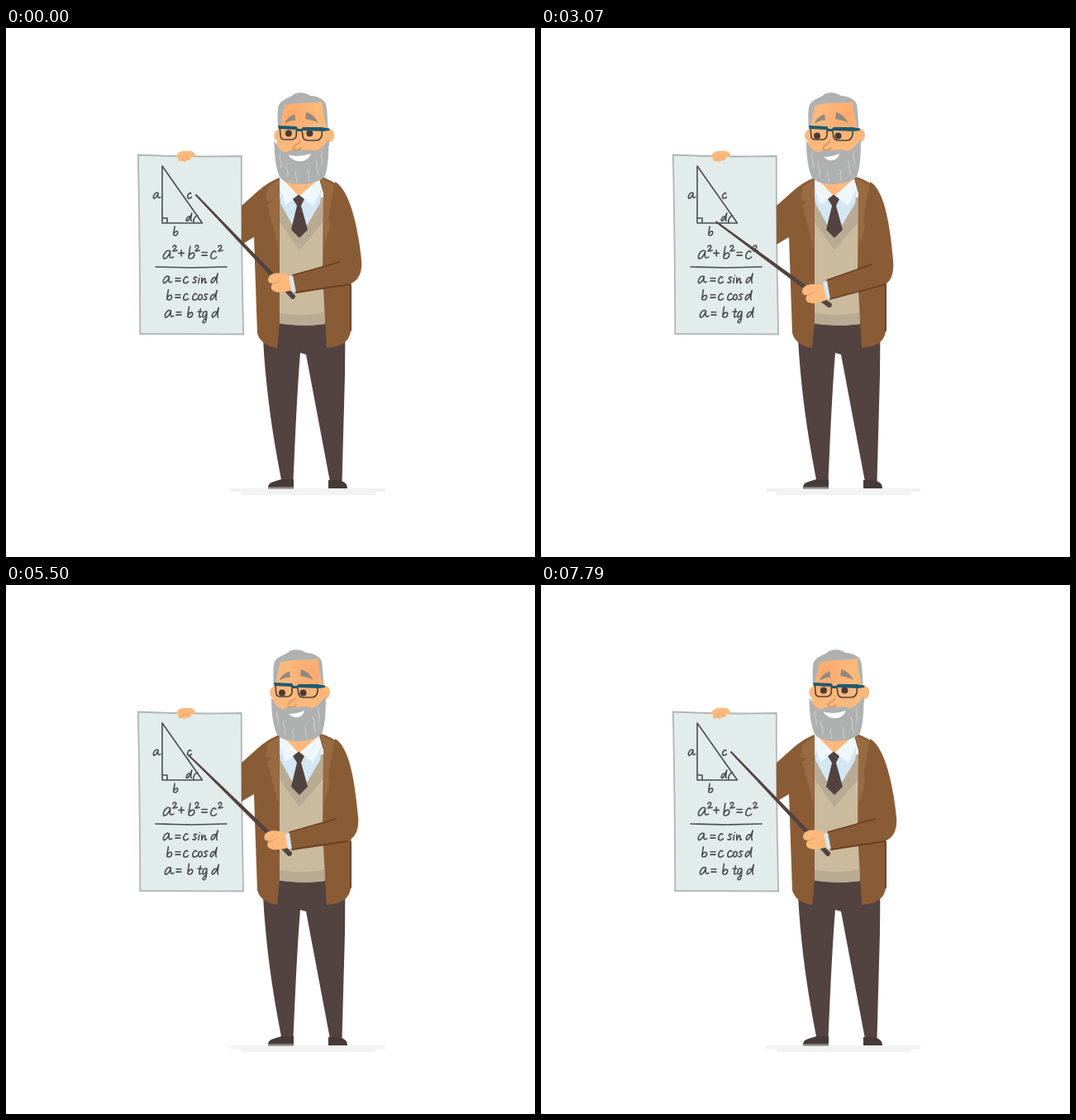
An HTML page for the animation above (7870 ms loop, 640 by 640 pixels).

```html
<!DOCTYPE html>
<html lang="en">
<head>
<meta charset="utf-8">
<title>Geometry lesson</title>
<style>
html, body { margin: 0; width: 100%; height: 100%; overflow: hidden; background: #fff; }
svg { display: block; width: 100%; height: 100%; }
.brown { fill: #8a5c36; }
.lapel { fill: #996b43; }
.dark { fill: #524340; }
.skin { fill: #fdb97c; }
.cloth { fill: #d3e7f3; }
.collar { fill: #eff7fd; }
.hair { fill: #afb1b1; }
.brow { fill: #8f8982; }
.ink, .seam, .strand, .rim, .nose, .crease { fill: none; stroke-linecap: round; stroke-linejoin: round; }
.ink { stroke: #4a4d4d; stroke-width: 1.6; }
.seam { stroke: #683f20; stroke-width: 1.8; }
.strand { stroke: #c8caca; stroke-width: 1.2; }
.rim { stroke: #514542; stroke-width: 1.7; }
.nose { stroke: #e08a55; stroke-width: 1.5; }
.crease { stroke: #ec9c63; stroke-width: 1; }
</style>
</head>
<body>
<svg viewBox="0 0 640 640" role="img" aria-label="A teacher points at a triangle and its formulas">
  <defs>
    <radialGradient id="glow" gradientUnits="userSpaceOnUse" cx="370" cy="106" r="34">
      <stop offset="0" stop-color="#fca96c"/><stop offset="1" stop-color="#fdb97c"/>
    </radialGradient>
  </defs>

  <path fill="#f2f2f2" d="M272 557H459V561.5H447V565H285V561.5H272Z"/>

  <g id="legs">
    <path class="dark" d="M311 352H410.5L410 420 406.5 549H392L363 395 356 393Q352 440 347.5 549H333.5C326 510 315 450 311 376Z"/>
    <path fill="#463a38" d="M317 556C317 549 325 549 333 546H348V557H317Z"/>
    <path fill="#7d8079" d="M317 555H348V557.5H317Z"/>
    <path fill="#463a38" d="M390 557V547H404C408 549 413 550 413 557Z"/>
  </g>

  <g id="board">
    <path fill="#e2ecea" stroke="#b0b6b6" stroke-width="1.8" d="M159.8 153.5Q220 156.5 284.8 155 284.5 260 287.2 370.5L162.3 370Q162 260 159.8 153.5Z"/>
    <path class="ink" d="M189 167V236H237.5ZM189 230H195V236M227 236C226 231 229 227 232 227M181 289 224 290 267 289"/>
    <g id="writing" class="ink"></g>
    <path class="skin" d="M206 156C207 150 213 148 219 149 225 148 229 151 229 154 229 157 225 156 224 156 224 161 220 161 219 159 218 163 214 163 213 160 210 163 207 161 208 156Z"/>
    <path class="crease" d="M213 160 215 156M219 159 220 155"/>
  </g>

  <g id="torso">
    <path fill="#cabb9e" d="M329 205H386V358C367 361 346 360 329 357Z"/>
    <path fill="#b9ab93" d="M329 344C346 348 368 348 386 344V358C367 361 346 360 329 357ZM329 205H386V232L355 269 329 232Z"/>
    <path class="cloth" d="M330 184H384L380 212 355 254 332 212Z"/>
    <path class="skin" d="M335 176H379L378 188 355 204 335 188Z"/>
    <path class="collar" d="M334 182 330 190 338 214 354 203ZM379 182 384 190 372 215 355 203Z"/>
    <path class="dark" d="M347 207 354 201.5 361 207 357 215 365 244 355 254 345 244 352 215Z"/>
    <path class="brown" d="M331 181C321 185 313 190 304 198L285 215V262L300 253 304 369C306 379 317 386 328 387L331 357Z"/>
    <path class="brown" d="M378 179C388 182 395 185 402 191L412 225 417.5 305V362C417 374 413 385 388 387L383 300 384 200Z"/>
    <path class="lapel" d="M331 183 317 192 314 208 322 210 316 214 330 266ZM380 181 399 191 402 207 393 210 399 215 385 264 384 198Z"/>
    <path class="seam" d="M417 311V366"/>
  </g>

  <g id="head">
    <path class="hair" d="M322 142C326 126 321 102 325 93 328 86 338 85 343 80 349 77 358 78 363 82 371 82 380 86 382 93 384 104 384 126 386 142Z"/>
    <ellipse class="skin" cx="325" cy="130" rx="6" ry="7"/>
    <ellipse class="skin" cx="386" cy="130" rx="6" ry="8"/>
    <path fill="url(#glow)" d="M332 94C344 89 366 92 377 89 379 102 380 114 384 122V160H323V124C329 116 328 104 332 94Z"/>
    <g id="features">
      <path class="brow" d="M331 114C334 109 338 106 343 104.5L344 112C340 111 336 113 332 115ZM356 110 357 102C363 104 368 107 371.5 115 367 112 361 111 356 110Z"/>
      <path class="nose" d="M350 137C348 141 340 142 341 146 343 149 349 148 351 145"/>
    </g>
    <g id="pupils" fill="#4b3b36"><ellipse cx="334" rx="4"/><ellipse cx="359.5" rx="4"/></g>
    <path class="rim" d="M326 121 327 132Q328 135 332 135L341 135Q346 134 346 129V124Q350 122 353 125L354 132Q355 136 360 136H371Q376 135 377 129V122"/>
    <path fill="#1e5a70" d="M324 118 346 119 348 122H352L354 120 376 120 386 121.5V124L378 125 354 124 352 125H347L345 123 325 122Z"/>
  </g>

  <g id="beard">
    <path class="hair" d="M321 136C325 143 329 151 337 150 341 146 346 149 350 148 357 148 365 146 370 149 377 148 382 141 387 134 387 154 386 170 382 180 376 186 362 189 353 189 343 189 333 187 328 181 323 171 321 154 321 136Z"/>
    <path class="strand" d="M328 153C325 159 332 162 329 169M336 164C333 170 340 173 337 180M347 174C345 179 350 181 348 186M361 171C365 176 360 180 364 185M371 160C376 166 370 169 375 178M379 149C375 155 382 159 378 166"/>
    <path id="mouth" fill="#fff"/>
  </g>

  <g id="arm">
    <path id="pole" class="dark"/>
    <g id="hand">
      <path class="skin" d="M-13-6C-11-11-4-12 2-11L17-8V9C8 12-2 13-7 10-11 8-11 4-8 1-12 1-15-2-13-6Z"/>
      <path class="crease" d="M-8 1C-5 1-2 0 0-2"/>
    </g>
    <path id="cuff" class="cloth"/>
    <path id="sleeve" class="brown"/>
    <path id="folds" class="seam"/>
  </g>
</svg>
<script>
const LOOP = 7870, STEPS = 110;
const $ = id => document.getElementById(id);
const smooth = x => (x = Math.min(1, Math.max(0, x)), x * x * (3 - 2 * x));
const mix = (a, b, k) => a + (b - a) * k;
const set = (id, name, value) => $(id).setAttribute(name, value);

// Handwritten letters, baseline at 0, x-height about 9
const letters = {
  a: 'M9-9C4-13-1-3 1 0C4 1 8-5 9-9C8-3 8 1 13-2',
  b: 'M3-15C2-9 1-4 1-1C3 1 8 0 8-5C8-8 4-8 1-3',
  c: 'M7-8C5-12 0-6 1-1C3 1 6 0 8-2',
  d: 'M7-7C3-11-1-2 1 0C4 0 8-7 10-14C9-8 7-3 9 0',
  s: 'M6-8C3-10 0-7 3-5C6-3 4 1 0-1',
  i: 'M2-7L1 0M3-11v.1',
  n: 'M1-8V0C3-6 6-9 6-5L6 0L8-1',
  o: 'M4-8C0-8 0 0 3 0C7-1 8-8 4-8Z',
  t: 'M4-12L2-2Q2 1 5-1M0-8H6',
  g: 'M7-8C2-11 0-1 2 0C5 0 7-5 7-8C7 0 6 8 3 8C0 8 1 4 6 1',
  2: 'M0-6C1-10 6-8 4-5L0 0L6-1',
  '=': 'M0-5H7M0-1H7',
  '+': 'M0-4H7M3.5-8V0'
};

// Each row: baseline, scale, then letters with their x
const rows = [
  [206, .68, 'a178 c219'], [251, .72, 'b202'], [233.5, .68, 'd218'],
  [279, .98, 'a190 b220 c247'], [276, .9, '+209 =237'],
  [270, .85, '2202 2229 2257'],
  [308.5, .82, 'a190 c214 s226 i232 n236 d248'], [307, .85, '=205'],
  [329, .82, 'b194 c214 c225 o232 s239 d247'], [327, .85, '=205'],
  [350, .84, 'a192 b219 t232 g237 d249'], [348, .85, '=206']
];
$('writing').innerHTML = rows.map(([y, size, row]) => row.split(' ').map(item =>
  `<path d="${letters[item[0]]}" stroke-width="${1.6 / size}" transform="translate(${item.slice(1)} ${y}) scale(${size})"/>`
).join('')).join('');

// Pole end x, y, angle; upper sleeve edge from/to; lower edge from/to; elbow x
const poses = {
  rest: [348, 326, 46.4, 404, 283, 347, 299, 416, 310, 351, 320, 430],
  a:    [318, 317, 42,   392, 280, 322, 292, 408, 309, 325, 313, 420],
  aa:   [361, 351, 23.3, 399, 289, 349, 323, 418, 311, 359, 344, 425],
  b:    [350, 336, 36.3, 400, 286, 346, 305, 417, 310, 350, 328, 426],
  bb:   [372, 356, 29.5, 407, 291, 362, 328, 429, 309, 372, 346, 433],
  c:    [344, 326, 44.3, 399, 283, 343, 299, 413, 310, 346, 320, 426],
  cc:   [392, 377, 35.5, 404, 299, 379, 351, 432, 307, 396, 363, 431]
};
// Start step, end step, pose reached
const moves = [
  [0, 8, 'a'], [9, 22, 'aa'], [23, 43, 'b'], [43, 55, 'bb'],
  [56, 77, 'c'], [78, 89, 'cc'], [100, 109, 'rest']
];
const beats = [10, 44, 78];

function poseAt(step) {
  let pose = poses.rest;
  for (const [from, to, name] of moves) {
    if (step < from) break;
    const k = smooth((step - from) / (to - from));
    pose = pose.map((v, i) => mix(v, poses[name][i], k));
  }
  return pose;
}

function drawArm([ex, ey, angle, ux, uy, vx, vy, lx, ly, mx, my, elbow]) {
  const c = Math.cos(angle * Math.PI / 180), s = Math.sin(angle * Math.PI / 180);
  const along = (d, w) => `${ex - d * c - w * s} ${ey - d * s + w * c}`;
  set('pole', 'd', `M${along(172, -1)}L${along(0, -3)}Q${along(-3, 0)} ${along(0, 3)}L${along(172, 1)}Z`);

  const dx = (vx + mx - ux - lx) / 2, dy = (vy + my - uy - ly) / 2;
  const len = Math.hypot(dx, dy), px = dx / len * 5, py = dy / len * 5;
  const turn = Math.atan2(-dy, -dx) * 180 / Math.PI;
  set('hand', 'transform', `translate(${ex - 25 * c} ${ey - 25 * s}) rotate(${turn + 10})`);
  set('cuff', 'd', `M${vx} ${vy + 1}l${px} ${py}L${mx + px} ${my + py - 2}L${mx} ${my - 1}Z`);
  set('sleeve', 'd', `M398 186C418 197 ${elbow - 3} 250 ${elbow} 281Q${elbow + 2} 303 ${lx} ${ly}L${mx} ${my}L${vx} ${vy}L${ux} ${uy}L390 230Z`);
  set('folds', 'd', `M${ux} ${uy}L${vx} ${vy}M${lx} ${ly}L${mx} ${my}`);
}

function drawHead(step) {
  const front = step < 50 ? 1 - smooth(step / 8) : smooth((step - 100) / 9);
  set('head', 'transform', `translate(${5.3 * front} 0)`);
  set('beard', 'transform', `translate(${3.5 * front} 0)`);
  set('features', 'transform', `translate(${front} 0)`);
  set('glow', 'cx', mix(370, 340, front));

  let lid = 0, wide = 1;
  for (const beat of beats) {
    const t = step - beat;
    lid += smooth((t - 5) / 4) - smooth((t - 12) / 4);
    wide = Math.min(wide, smooth((Math.abs(t) - 2) / 6));
  }
  wide = Math.max(wide, front);
  for (const eye of $('pupils').children) {
    eye.setAttribute('cy', 130.5 + lid);
    eye.setAttribute('ry', 4 - 2.3 * lid);
  }
  set('pupils', 'transform', `translate(${2.6 * front} ${-3 * front})`);

  const left = mix(342, 338, wide), right = mix(361, 365, wide), drop = mix(163, 165, wide);
  set('mouth', 'd', `M${left} ${mix(156, 153.5, wide)}Q352 ${mix(156, 157, wide)} ${right} 152C${right - 2} ${drop - 2} ${left + 7} ${drop} ${left} ${mix(156, 153.5, wide)}Z`);
}

function draw(now) {
  const step = Math.floor((now % LOOP + 12) * STEPS / LOOP) % STEPS;
  drawArm(poseAt(step));
  drawHead(step);
}

const start = performance.now();
function tick() {
  draw(performance.now() - start);
  requestAnimationFrame(tick);
}
tick();
</script>
</body>
</html>
```
